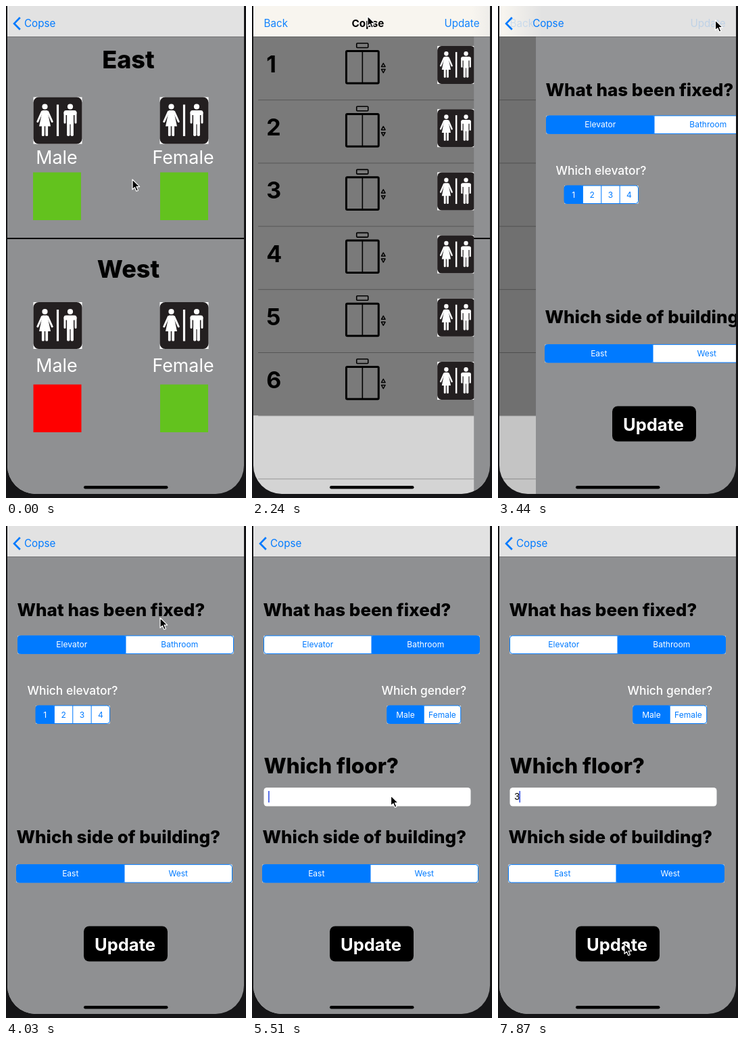
An HTML page that plays this animation: 355x726 px, repeating every 8000 ms.

```html
<!DOCTYPE html>
<html lang="en">
<head>
<meta charset="utf-8">
<title>Building status app</title>
<style>
  html, body { margin: 0; width: 100%; height: 100%; overflow: hidden; background: #151517; }
  svg { display: block; font-family: Inter, Roboto, "Liberation Sans", sans-serif; }
</style>
</head>
<body>
<svg id="stage" width="355" height="726" viewBox="0 0 355 726"></svg>
<script>
const LOOP = 8000;
const BLUE = '#007aff', GREEN = '#63c21e', PAGE = '#8f9092';
const stage = document.getElementById('stage');
const HALL = 'Copse';

// ---- markup helpers ----
const rect = (x, y, w, h, fill, extra = '') =>
  `<rect x="${x}" y="${y}" width="${w}" height="${h}" fill="${fill}" ${extra}/>`;
const text = (x, y, size, str, fill = '#000', weight = 400, anchor = 'start', extra = '') =>
  `<text x="${x}" y="${y}" font-size="${size}" font-weight="${weight}" fill="${fill}" text-anchor="${anchor}" ${extra}>${str}</text>`;
const restroom = (x, y, w, h) =>
  `<use href="#restroom" transform="translate(${x} ${y}) scale(${w / 72} ${h / 69})"/>`;

const restroomSymbol = `<g id="restroom">
  ${rect(0, 0, 72, 69, '#fff')}${rect(0, 0, 72, 69, '#231f20', 'rx="8"')}
  <g fill="#fff" stroke="none">
    <circle cx="17" cy="14" r="4.1"/><circle cx="54.5" cy="14" r="4.1"/>
    <path d="M13.5 19.5H20.5L25.5 43H8.5Z"/>
    ${rect(12.4, 42, 3.8, 15.5, '#fff', 'rx="1.5"')}${rect(17.8, 42, 3.8, 15.5, '#fff', 'rx="1.5"')}
    ${rect(34.4, 11, 3.2, 46.5, '#fff')}
    ${rect(45, 19.5, 19, 7, '#fff', 'rx="3.4"')}${rect(49.6, 20, 9.8, 20, '#fff')}
    ${rect(49.6, 36, 4.3, 21.5, '#fff', 'rx="1.8"')}${rect(55.1, 36, 4.3, 21.5, '#fff', 'rx="1.8"')}
    <path d="M12.8 21.5L6.3 36M21.2 21.5L27.7 36M46.5 23V37.5M62.5 23V37.5"
      stroke="#fff" stroke-width="3" stroke-linecap="round"/>
  </g></g>`;

const elevatorSymbol = `<g id="elevator" fill="none" stroke="#000">
  <rect x="161.6" y="55" width="17" height="6.5" rx="1" stroke-width="1.6"/>
  <rect x="146.3" y="66.4" width="47.8" height="47.6" rx="1.5" stroke-width="3"/>
  <path d="M170.2 67V114" stroke-width="1.6"/>
  <path d="M198.3 89.5L201.1 84.5L203.9 89.5ZM198.3 93.5L201.1 98.5L203.9 93.5Z" stroke-width="1.5" stroke-linejoin="round"/>
</g>`;

// ---- pages ----
const side = (name, titleY, iconY, labelY, boxY, maleX, maleColor) =>
  text(181, titleY, 36, name, '#000', 800, 'middle') +
  restroom(40.5, iconY, 72, 69) + restroom(227.5, iconY, 72, 69) +
  text(75, labelY, 26.8, 'Male', '#fff', 400, 'middle') +
  text(262, labelY, 26.8, 'Female', '#fff', 400, 'middle') +
  rect(maleX, boxY, 71, 70.5, maleColor) + rect(228, boxY, 71, 70.5, GREEN);

const sidesPage = rect(2, 0, 350, 726, PAGE) +
  side('East', 92, 134.5, 232.5, 245.5, 40, GREEN) +
  rect(2, 342, 350, 2, '#000') +
  side('West', 401, 437, 540, 558.5, 40.5, '#f00');

const ROW = 93.2;
const listRow = i => `<g transform="translate(0 ${i * ROW})">
  ${text(28, 98, 34, i + 1, '#000', 700)}<use href="#elevator"/>${restroom(281, 59, 56, 56)}</g>`;
const listPage = rect(2, 0, 350, 726, '#d6d6d6') + rect(2, 45, 350, 6 * ROW, '#7b7b7b') +
  [0, 1, 2, 3, 4, 5].map(listRow).join('') +
  [1, 2, 3, 4, 5, 6, 7].map(i => rect(16, 45 + i * ROW, 336, 1, '#000', 'opacity=".3"')).join('');

function segments(id, x, y, w, labels) {
  const cell = w / labels.length, h = 26.5;
  return `<g id="${id}">` + rect(x, y, w, h, '#fff') +
    labels.map((label, i) =>
      rect(x + i * cell, y, cell, h, '#fff', 'rx="2"') +
      text(x + (i + .5) * cell, y + 17.5, 12, label, BLUE, 400, 'middle')).join('') +
    labels.slice(1).map((_, i) => rect(x + (i + 1) * cell - .5, y, 1, h, BLUE)).join('') +
    `<rect x="${x}" y="${y}" width="${w}" height="${h}" rx="4" fill="none" stroke="${BLUE}"/></g>`;
}

const formPage = rect(2, 0, 350, 726, PAGE) +
  text(16.5, 133, 26, 'What has been fixed?', '#000', 800) +
  segments('kind', 17.5, 161.9, 319, ['Elevator', 'Bathroom']) +
  `<g id="elevatorForm">${text(31.5, 249, 17.4, 'Which elevator?', '#fff', 500)}
    ${segments('shaft', 44, 265, 109.5, ['1', '2', '3', '4'])}</g>
  <g id="bathroomForm">${text(191.5, 249, 17.4, 'Which gender?', '#fff', 500)}
    ${segments('gender', 199.7, 265, 109, ['Male', 'Female'])}
    ${text(17.5, 365, 31.4, 'Which floor?', '#000', 800)}
    ${rect(17.5, 386, 306, 27.5, '#fff', 'rx="4.5"')}
    ${text(24, 404, 13.5, '3', '#000', 400, 'start', 'id="typed"')}
    ${rect(24, 391, 1.8, 17, '#4a63e6', 'id="caret"')}</g>` +
  text(15.5, 467.5, 26, 'Which side of building?', '#000', 800) +
  segments('wing', 15.5, 499.6, 319, ['East', 'West']) +
  rect(115, 590.5, 124, 52, '#000', 'rx="8"') +
  text(176, 626.5, 25.5, 'Update', '#fff', 700, 'middle');

stage.innerHTML = `<defs>${restroomSymbol}${elevatorSymbol}
  <linearGradient id="tint" gradientUnits="userSpaceOnUse" x1="0" x2="60" y1="0" y2="0">
    <stop stop-color="#f8f5ef"/><stop offset="1" stop-color="#e2e2e2"/></linearGradient>
  <clipPath id="screen"><rect x="2" y="-60" width="350" height="780" rx="42"/></clipPath></defs>
  ${rect(0, 0, 355, 726, '#151517')}
  <g clip-path="url(#screen)">
    <g id="list">${listPage}</g>
    ${rect(2, 0, 350, 726, '#000', 'id="dim"')}
    <g id="sides">${sidesPage}</g>
    <g id="form">${formPage}</g>
    ${rect(2, 0, 350, 45, 'url(#tint)')}
    ${rect(2, 45, 350, 1, '#000', 'opacity=".2"')}
    ${text(17.5, 31, 15.2, 'Back', BLUE, 400, 'start', 'id="back"')}
    ${text(336.5, 31, 15.2, 'Update', BLUE, 400, 'end', 'id="update"')}
    ${text(0, 31, 15.2, HALL, '#000', 700, 'start', 'id="title"')}
    <g id="parent"><path d="M20.8 17L12.1 25.9L20.8 34.8" fill="none" stroke="${BLUE}" stroke-width="2.7"/>
      ${text(0, 31, 15.2, HALL, BLUE, 400, 'start', 'id="label"')}</g>
    ${rect(115, 708, 124.5, 4.5, '#000', 'rx="2.25"')}
  </g>
  <path id="pointer" d="M0 0V14.8L3.4 11.6L5.8 17.2L8.4 16.1L6 10.6H10.7Z"
    fill="#000" stroke="#fff" stroke-width="1.2" stroke-linejoin="round"/>`;

const el = {};
stage.querySelectorAll('[id]').forEach(node => el[node.id] = node);
const set = (node, attrs) => Object.entries(attrs).forEach(([k, v]) => node.setAttribute(k, v));
const slide = (node, x) => set(node, { transform: `translate(${x} 0)` });
const show = (node, on) => set(node, { visibility: on ? 'visible' : 'hidden' });

function select(group, index) {
  const boxes = [...group.querySelectorAll('rect')].slice(1);
  group.querySelectorAll('text').forEach((label, i) => {
    set(boxes[i], { fill: i === index ? BLUE : '#fff' });
    set(label, { fill: i === index ? '#fff' : BLUE });
  });
}

// ---- timing ----
// Bursts of picture updates: first, last, count.
const bursts = [[0, 0, 1], [750, 750, 1], [1050, 1650, 5], [1950, 2990, 8], [3290, 4330, 8],
  [4630, 5210, 5], [5510, 5510, 1], [6100, 6400, 3], [6700, 7730, 8], [7870, 7870, 1]];
const ticks = bursts.flatMap(([from, to, n]) => Array.from({ length: n }, (_, i) =>
  n === 1 ? from : from + Math.floor((to - from) * i / (n - 1) / 10) * 10));
const hold = t => ticks.filter(tick => tick <= t).pop();

// Pointer stops: time, x, y.
const stops = [[0, 187, 256], [740, 187, 256], [750, 186.5, 229], [1040, 186.5, 229], [1050, 170, 195],
  [1650, 32, 15], [1950, 32, 15], [2090, 85, 14], [2240, 171, 15], [2540, 305, 20], [2690, 321.5, 21],
  [3590, 321.5, 21], [3880, 255, 108], [4030, 228, 135.5], [4330, 248, 168], [4630, 248, 168],
  [5210, 205.5, 398], [6400, 205.5, 398], [6700, 208, 410], [7150, 246, 507], [7430, 246, 507],
  [7730, 190, 605], [7870, 187, 616.5]];

const clamp = v => Math.max(0, Math.min(1, v));
const mix = (a, b, p) => a + (b - a) * p;

function pointerAt(t) {
  const i = stops.findIndex(s => s[0] >= t);
  if (i <= 0) return i ? stops[stops.length - 1].slice(1) : stops[0].slice(1);
  const a = stops[i - 1], b = stops[i], p = (t - a[0]) / (b[0] - a[0]);
  return [mix(a[1], b[1], p), mix(a[2], b[2], p)];
}

// Critically damped spring, settled after half a second.
function spring(ms) {
  if (ms <= 0) return 0;
  if (ms > 500) return 1;
  const x = ms * .017;
  return 1 - Math.exp(-x) * (1 + x);
}

function draw(time) {
  const t = hold(time);
  const pop = spring(t - 1980), push = spring(t - 3234);
  const cover = t < 2700 ? 1 - pop : push;

  slide(el.sides, 349 * pop);
  show(el.sides, pop < 1);
  slide(el.form, 349 * (1 - push));
  show(el.form, push > 0);
  slide(el.list, -105 * cover);
  set(el.dim, { opacity: .1 * cover });

  // The translucent bar picks up a soft copy of the sliding page edge.
  const tintX = mix(352, -58, cover);
  set(el.tint, { x1: tintX, x2: tintX + 60 });
  const labelX = 27 + 156 * (1 - cover), titleX = 27 + 129 * (1 - cover);
  const backPressed = t >= 1950 && t < 2700;
  set(el.parent, { opacity: clamp((cover - .5) * 3) * (backPressed ? .22 : 1) });
  set(el.label, { x: labelX });
  set(el.title, { x: titleX, opacity: clamp((.5 - cover) * 3) });
  set(el.back, { opacity: 1 - cover });
  set(el.update, { opacity: t >= 3290 ? Math.min(.2, 1 - cover) : 1 - cover });

  const bathroom = t >= 4630;
  select(el.kind, bathroom ? 1 : 0);
  select(el.shaft, 0);
  select(el.gender, 0);
  select(el.wing, t >= 7290 ? 1 : 0);
  set(el.elevatorForm, { display: bathroom ? 'none' : 'inline' });
  set(el.bathroomForm, { display: bathroom ? 'inline' : 'none' });

  const typed = t >= 6250;
  const caretOn = (t >= 5510 && t < 6100) || (t >= 6250 && t < 6850) || (t >= 7290 && t < 7730) || t >= 7870;
  set(el.typed, { opacity: typed ? 1 : 0 });
  set(el.caret, { x: typed ? 31.3 : 24, opacity: caretOn ? 1 : 0 });

  set(el.pointer, { transform: `translate(${pointerAt(t)})` });
}

const start = performance.now();
function frame() {
  draw((performance.now() - start) % LOOP);
  requestAnimationFrame(frame);
}
frame();
</script>
</body>
</html>
```
